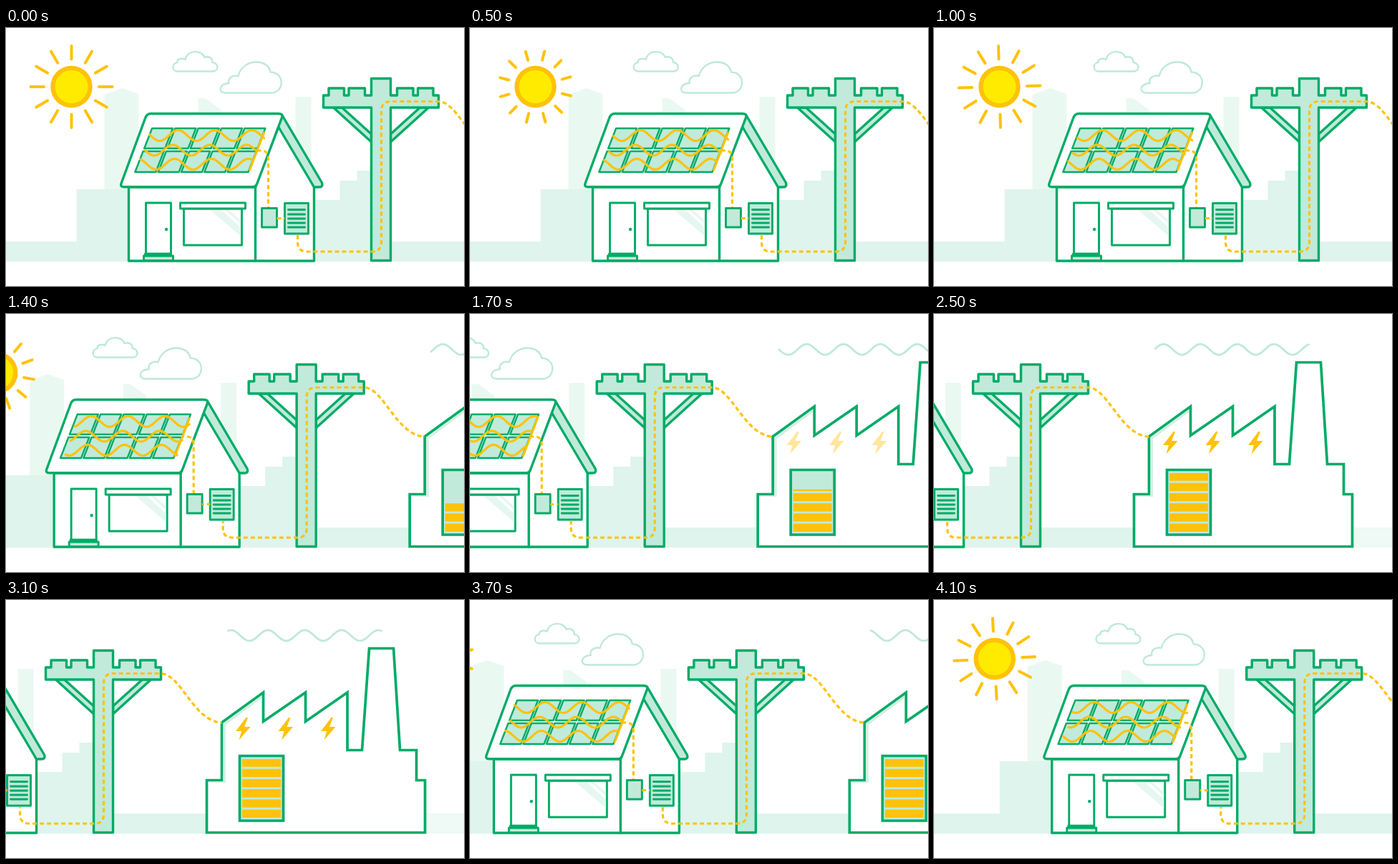
An HTML page for the animation above (4200 ms loop, 640 px wide and 360 px high).

```html
<!DOCTYPE html>
<html lang="en">
<head>
<meta charset="utf-8">
<title>Solar power to the grid</title>
<style>
  html, body { margin: 0; width: 100%; height: 100%; overflow: hidden; background: #fff; }
  svg { display: block; width: 640px; height: 360px; }
  .line { fill: none; stroke: #00ab67; stroke-width: 3.4; stroke-linejoin: round; stroke-linecap: round; }
  .white { fill: #fff; }
  .teal { fill: #c1eadb; }
  .thin { stroke-width: 2.9; }
  .pale { fill: #dff4ec; }
  .mist { fill: none; stroke: #bfe9da; stroke-width: 2.4; stroke-linejoin: round; }
  .power { fill: none; stroke: #ffc20a; stroke-width: 3.2; stroke-linecap: round; stroke-linejoin: round; }
  .dash { stroke-linecap: butt; stroke-dasharray: 6 4; }
  .gold { fill: #ffc20a; }
</style>
</head>
<body>
<svg viewBox="0 0 640 360">
  <g id="world">
    <g class="pale">
      <path d="M-10 298H973V326H-10Z"/>
      <path d="M973 298H1040V326H973Z" opacity=".5"/>
      <path d="M98 326V225H185V326Z"/>
      <path d="M137 225V93L162 84L185 92V225ZM268 98H278L300 114V122H268ZM404 96H426V200H404Z" opacity=".65"/>
      <path d="M430 326V240H466V213H490V199H512V326Z"/>
    </g>

    <g id="sun">
      <g id="rays" class="power" style="stroke-width:4"></g>
      <circle class="gold" cx="91" cy="82" r="29.3"/>
      <circle cx="91" cy="82" r="23" fill="#ffeb00"/>
    </g>

    <g id="clouds" class="mist">
      <path d="M239 60.5H289C297 60 297 49 288 48C288 41 282 39 277 41C273 30 253 30 250 44C244 41 238 44 239 48C231 49 231 60 239 60.5Z"/>
      <path d="M306 90.5H371C389 89 389 62 369 61.5C366 42 330 42 324 67C315 65 309 71 311 77C297 78 295 90 306 90.5Z"/>
    </g>

    <g id="house" class="line">
      <path class="white" d="M171 222V325H430V222L384 128L348 222Z"/>
      <path d="M348 222V325"/>
      <path class="teal" d="M385 121L441 216Q443 222 437 222H430L379 136Z"/>
      <path class="white" d="M202 119.500H380Q387 119.500 385 125L350 218Q348.500 221.700 345 221.700H164Q159 221.700 160.500 217L194 126Q196 119.500 202 119.500Z"/>
      <g id="panels" class="teal" stroke-width="2.400"></g>
      <g class="thin white">
        <path d="M195 244H230V318H195Z"/>
        <path class="teal" d="M194 315H230V318H194ZM192 318H233V324.500H192Z"/>
        <path d="M248 252H329V303H248Z"/>
        <path d="M243 244H334V252H243Z"/>
      </g>
      <path class="teal" stroke="none" d="M285 254H301L328 279V291ZM306 254H311L328 269V274Z" opacity=".4"/>
      <circle cx="223.500" cy="281" r="2.200" fill="#00ab67" stroke="none"/>
      <path class="teal thin" d="M357 251.500H378V278H357Z"/>
      <path class="teal thin" d="M389 244.500H422V287H389Z"/>
      <path class="thin" d="M394 253.500H417M394 260H417M394 266H417M394 272H417M394 278H417"/>
    </g>

    <g class="line teal">
      <path d="M457 111L510 159V148L469 111ZM590 111L537 159V148L578 111Z"/>
      <path d="M443 94H450.500V84H472V94H478.500V84H501V94H510V70.500H537V94H546V84H568.500V94H575V84H596.500V94H604V111H537V324.500H510V111H443Z"/>
    </g>

    <g id="factory" class="line" style="stroke-width:3.700;stroke-linejoin:miter">
      <path class="white" d="M668 324.500V251.500H689V171L747 129V169.500L806 129V169.500L864.500 129V209.500H885L895 67.500H929L938 209.500H961V251.500H973V324.500Z"/>
      <path class="teal" stroke="none" d="M690.800 172L745 133V137L694.500 174V255H672V253.300H690.800Z" opacity=".7"/>
      <path class="teal" d="M714 217.500H775V308H714Z"/>
      <g id="bars" class="gold" stroke="none"></g>
      <g id="bolts" class="gold" stroke="none"></g>
    </g>
    <path id="smoke" class="mist" style="stroke-width:2.800"/>

    <g class="power">
      <path class="wave"/>
      <path class="wave"/>
      <path class="wave"/>
      <path d="M360 146L340 198"/>
    </g>
    <g class="power">
      <path class="dash" d="M350 171H356Q366 171 366 182V250"/>
      <path class="dash" d="M378 265.500H389"/>
      <path class="dash" d="M407 289V299Q407 312 420 312H511Q524 312 524 299V116Q524 102.500 537 102.500H604C632 103 649 169 689 171.300"/>
    </g>
  </g>
</svg>
<script>
const LOOP = 4200, STEP = 100, PAN = 389, WAVELENGTH = 51.5;
const $ = id => document.getElementById(id);
const all = selector => [...document.querySelectorAll(selector)];
const clamp = v => Math.min(1, Math.max(0, v));
const ramp = (t, start, length) => clamp((t - start) / length);
const smooth = u => u * u * (3 - 2 * u);
const swing = turns => (1 - Math.cos(2 * Math.PI * turns)) / 2;

function add(parent, d) {
  const path = document.createElementNS('http://www.w3.org/2000/svg', 'path');
  path.setAttribute('d', d);
  return parent.appendChild(path);
}

for (let i = 0; i < 12; i++)
  add($('rays'), 'M91 43.500V25').setAttribute('transform', `rotate(${i * 30} 91 82)`);

const slant = y => 204 - (y - 139) * 0.39;
for (const [top, bottom] of [[140, 168], [172, 201]])
  for (let i = 0; i < 5; i++) {
    const a = slant(top) + i * 32.3, b = slant(bottom) + i * 32.3;
    add($('panels'), `M${a} ${top}h29L${b + 29} ${bottom}h-29Z`);
  }

const bars = Array.from({ length: 6 }, (_, i) => ({ top: 221.5 + i * 14.2, path: add($('bars'), '') }));
for (let i = 0; i < 3; i++)
  add($('bolts'), `M${723 + i * 59.5} 164l-14.500 19h8l-3.500 12.500l16-18.500h-8.500l5-13z`);

function sine(x0, x1, y, crest) {
  let d = '';
  for (let x = x0; x <= x1; x += 2)
    d += `${d ? 'L' : 'M'}${x} ${(y - 7.5 * Math.cos((x - crest) / WAVELENGTH * 2 * Math.PI)).toFixed(2)}`;
  return d;
}

const rows = [[200, 360, 150, 240], [194, 350, 170.5, 232.5], [187, 343, 190, 235]];
const waves = all('.wave'), dashes = all('.dash');

function draw(t) {
  const turn = t / LOOP, travel = 8 * WAVELENGTH * turn;
  const there = smooth(ramp(t, 1043, 1050));
  const back = smooth(ramp(t, 3080, 1120) ** 0.87);
  $('world').setAttribute('transform', `translate(${0.5 + PAN * (back - there)} 0)`);
  $('rays').setAttribute('transform', `rotate(${120 * turn} 91 82)`);
  $('rays').setAttribute('stroke-dasharray', `${18.5 - 6 * swing(4 * turn)} 99`);
  $('clouds').setAttribute('transform', `translate(${-10 * swing(2 * turn)} 0)`);

  waves.forEach((wave, i) => {
    const [x0, x1, y, crest] = rows[i];
    wave.setAttribute('d', sine(x0, x1, y, crest + travel));
  });
  $('smoke').setAttribute('d', sine(697, 913, 49.5, 748.5 - travel));
  dashes.forEach(dash => dash.setAttribute('stroke-dashoffset', -170 * turn));

  const level = 304 - 82 * ramp(t, 790, 1260);
  for (const { top, path } of bars) {
    const from = Math.max(top, level), height = Math.max(0, top + 11.3 - from);
    path.setAttribute('d', `M717.500 ${from}h54v${height}h-54z`);
  }
  $('bolts').setAttribute('opacity', ramp(t, 1600, 250) * (1 - ramp(t, 3250, 250)));
}

function tick() {
  draw(Math.floor(performance.now() % LOOP / STEP) * STEP);
  requestAnimationFrame(tick);
}
tick();
</script>
</body>
</html>
```
